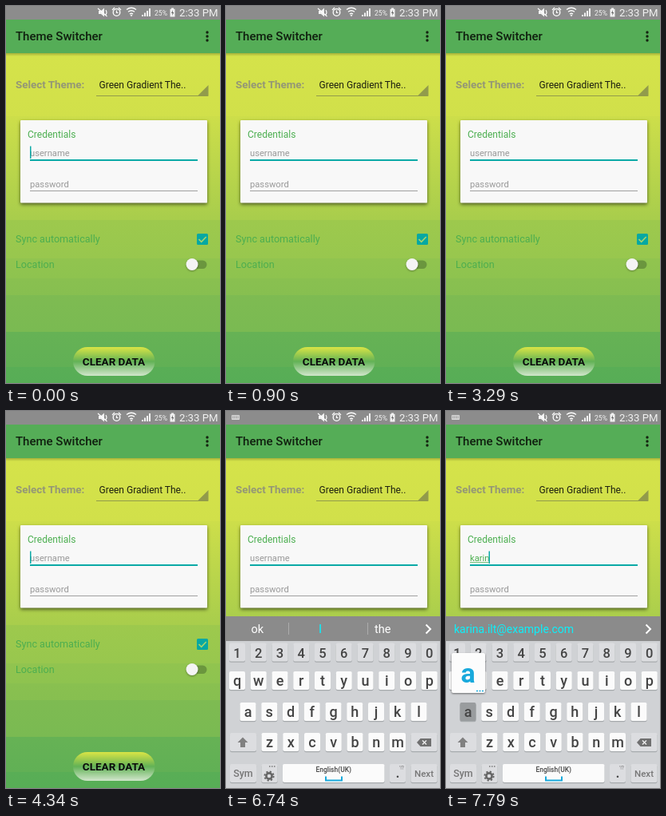
An HTML page that plays this animation: 268 by 472 pixels, repeating every 8000 ms.

```html
<!DOCTYPE html>
<html lang="en">
<head>
<meta charset="utf-8">
<title>Theme Switcher</title>
<style>
html, body { margin: 0; width: 100%; height: 100%; overflow: hidden; }
svg { display: block; width: 100vw; height: 100vh; font-family: Roboto, sans-serif; }
text { white-space: pre; }
.mid { text-anchor: middle; }
.card { fill: #f8f8f8; filter: drop-shadow(0 2px 2px rgba(0,0,0,.55)); }
.menu { fill: #f6f6f6; filter: drop-shadow(0 4px 5px rgba(0,0,0,.32)); }
.pop { fill: #fcfcfc; filter: drop-shadow(0 1px 1px rgba(0,0,0,.5)); }
.line { fill: none; stroke: #fff; }
</style>
</head>
<body>
<svg viewBox="0 0 268 472">
  <defs>
    <linearGradient id="bg" x1="0" y1="0" x2="0" y2="472" gradientUnits="userSpaceOnUse"></linearGradient>
    <linearGradient id="pill" x1="0" y1="0" x2="0" y2="1">
      <stop offset="0" stop-color="#dbe545"/>
      <stop offset=".5" stop-color="#62b256"/>
      <stop offset="1" stop-color="#d2e6cc"/>
    </linearGradient>
    <linearGradient id="edge" x1="0" y1="0" x2="0" y2="1">
      <stop offset="0" stop-opacity=".22"/>
      <stop offset="1" stop-opacity="0"/>
    </linearGradient>
  </defs>

  <rect width="268" height="472" fill="url(#bg)"/>
  <rect y="59" width="268" height="4" fill="url(#edge)"/>
  <rect y="17" width="268" height="42" fill="#55ad57"/>
  <rect width="268" height="17" fill="#8c8c8c"/>

  <!-- status bar -->
  <g fill="#f2f2f2">
    <path d="M116 6h3l4-3.500v11l-4-3.500h-3z"/>
    <path class="line" d="M115 3l11.500 10M125 5q2 3 0 6" stroke-width="1.100"/>
    <circle class="line" cx="138.500" cy="8" r="4.300" stroke-width="1.300"/>
    <path class="line" d="M138.500 5.500v3h2M133 5l3-3M144 5l-3-3" stroke-width="1.200"/>
    <path class="line" d="M151 4.500q6-4.500 12 0M153 7.300q4-3 8 0M155 10q2-1.500 4 0" stroke-width="1.400"/>
    <path d="M155.500 11h3l-1.500 2.500z"/>
    <path d="M170 11h2v2h-2zM173 8.500h2V13h-2zM176 6h2v7h-2zM179 3h2v10h-2z"/>
    <text x="186" y="12" font-size="8.600">25%</text>
    <path d="M207 2.500h3v1.200h1.500V13.500h-6V3.700h1.500z"/>
    <path d="M209 5l-2 4h1.500l-.5 3 2.300-4h-1.500z" fill="#666"/>
    <text x="217" y="13" font-size="13.200">2:33 PM</text>
    <g class="keys" opacity=".75"><rect x="7" y="5" width="10" height="6" rx=".8"/>
      <path d="M8 6.800h8M8 8.600h8" stroke="#777" stroke-width=".9" stroke-dasharray="1 .7"/></g>
  </g>

  <text x="12" y="43" font-size="15" font-weight="500" fill="#10200f">Theme Switcher</text>
  <g fill="#14220f"><circle cx="252" cy="33" r="1.700"/><circle cx="252" cy="38" r="1.700"/><circle cx="252" cy="43" r="1.700"/></g>

  <!-- theme spinner -->
  <text x="12" y="103" font-size="13.400" font-weight="700" fill="#949776">Select Theme:</text>
  <text x="116.500" y="103" font-size="12" fill="#1d2010">Green Gradient The..</text>
  <path d="M113 112h140v.9H113zM253.500 99v13.800h-13.800z" fill="#929b4b"/>

  <!-- credentials -->
  <rect class="card" x="18" y="143" width="234" height="103.500" rx="1"/>
  <text x="27" y="165" font-size="12" fill="#4caf50">Credentials</text>
  <text id="user" x="30" y="188" font-size="11.200"></text>
  <rect id="under" x="30" y="189.300" width="23.500" height=".8" fill="#4caf50"/>
  <text x="30" y="227" font-size="11.200" fill="#999">password</text>
  <rect x="30" y="192" width="210" height="2" fill="#0aa9a6"/>
  <rect x="30" y="231" width="210" height="1" fill="#a0a0a0"/>
  <rect id="caret" y="175.500" width="1.500" height="15.500" fill="#0aa9a6"/>

  <!-- options -->
  <g font-size="12.600" fill="#4cae50">
    <text x="12" y="296">Sync automatically</text>
    <text x="12" y="328">Location</text>
  </g>
  <rect x="239" y="285" width="14" height="14" rx="1.500" fill="#06a8a2"/>
  <path d="M241.500 292l3.200 3.300 6-6.300" fill="none" stroke="#a9d56a" stroke-width="1.600"/>
  <rect x="231" y="318.500" width="20.500" height="10.500" rx="5.200" fill="#6b963e"/>
  <circle cx="233" cy="323.500" r="7.500" fill="#f4f4f4" style="filter:drop-shadow(0 1px 1px rgba(0,0,0,.35))"/>
  <rect x="84" y="427" width="102.500" height="36" rx="18" fill="url(#pill)"/>
  <text class="mid" x="135" y="450" font-size="13.500" font-weight="700" fill="#0b0b0b">CLEAR DATA</text>

  <g id="menu" font-size="12" fill="#161616">
    <rect class="menu" x="111" y="82" width="131" height="72" rx="1"/>
    <text x="116.500" y="104">Material-Light</text>
    <text x="116.500" y="140">Green Gradient Theme</text>
  </g>

  <!-- keyboard -->
  <g class="keys">
    <rect y="257" width="268" height="31" fill="#8b8b8b"/>
    <g id="words" font-size="14.500" fill="#fff">
      <path d="M78.500 265v15M177.500 265v15" stroke="#acacac"/>
      <text x="31.500" y="277.500">ok</text>
      <text class="mid" x="118" y="277.500" font-weight="500" fill="#1ce2ec">I</text>
      <text x="186" y="277.500">the</text>
    </g>
    <text id="mail" x="10" y="278" font-size="14" fill="#0cf0fa">karina.ilt@example.com</text>
    <path class="line" d="M250.500 267.500l5.500 5.500-5.500 5.500" stroke-width="2"/>
    <rect y="288" width="268" height="184" fill="#d0d2d5"/>
    <g id="board"></g>
    <path d="M21 408.500l6.500 6.500h-3.500v6h-6v-6h-3.500z" fill="#808080"/>
    <path d="M239 415l4.500-5H257v10h-13.500z" fill="#707070"/>
    <path d="M246 412.500l5 5m0-5l-5 5" stroke="#eee" stroke-width="1.400"/>
    <circle cx="54" cy="457" r="3.600" fill="none" stroke="#666" stroke-width="2.600"/>
    <circle cx="54" cy="457" r="5.600" fill="none" stroke="#666" stroke-width="2" stroke-dasharray="2.200 2.200"/>
    <path d="M54 445h1.500m1.500 0h1.500m1.500 0h1.500" stroke="#777" stroke-width="1.300"/>
    <text x="217" y="449" font-size="6.500" fill="#777">'!?</text>
    <path id="space" d="M125 457.500v5h20v-5" fill="none" stroke-width="2"/>
  </g>
  <g id="pop">
    <rect class="pop" x="7" y="303" width="42" height="50" rx="2"/>
    <text class="mid" x="27.500" y="340" font-size="34" font-weight="700" fill="#18a9dc">a</text>
    <path d="M38 350.500h2m1.500 0h2m1.500 0h2" stroke="#18a9dc" stroke-width="1.700"/>
  </g>
</svg>
<script>
const $ = id => document.getElementById(id);
const show = (el, on) => { el.style.display = on ? '' : 'none'; };
const WHITE = '#fbfbfb', GREY = '#dcdde0', DARK = '#444', SOFT = '#777';

// Each band: top, bottom, first and last colour
const bands = [
  [59, 138, '#d5e34a', '#d1e04a'],
  [138, 268, '#cdde4a', '#a8cd4c'],
  [268, 316, '#9dc94d', '#98c74e'],
  [316, 341, '#91c44f', '#8ec34f'],
  [341, 362, '#89c050', '#87bf50'],
  [362, 408, '#7ebb52', '#7aba52'],
  [408, 452, '#66b255', '#61b055'],
  [452, 472, '#59ae56', '#57ad56'],
];
$('bg').innerHTML = bands.map(([top, bottom, from, to]) =>
  `<stop offset="${top / 472}" stop-color="${from}"/><stop offset="${bottom / 472}" stop-color="${to}"/>`).join('');

let board = '';
function key(x, y, w, label, size = 18, fill = WHITE, base = 18, ink = DARK) {
  const id = label === 'a' ? 'id="keyA"' : '';
  board += `<rect x="${x}" y="${y + 1.3}" width="${w}" height="23" rx="2" fill="#a6aaad"/>
    <rect ${id} x="${x}" y="${y}" width="${w}" height="23" rx="2" fill="${fill}"/>
    <text class="mid" x="${x + w / 2}" y="${y + base}" font-size="${size}" font-weight="500" fill="${ink}">${label}</text>`;
}
function row(chars, x, y, size, fill) {
  [...chars].forEach((c, i) => key(x + i * 26.75, y, 20, c, size, fill));
}
row('1234567890', 4, 290.5, 16.5, GREY);
row('qwertyuiop', 4, 326);
row('asdfghjkl', 17.5, 365);
key(5, 403, 33, '', 12, GREY);
row('zxcvbnm', 44.5, 403);
key(231.5, 403, 33, '', 12, GREY);
key(5, 442, 33, 'Sym', 12.5, GREY, 16, SOFT);
key(44.5, 442, 20, '', 12, GREY);
key(71, 442, 127.5, 'English(UK)', 8.5, WHITE, 10);
key(205, 442, 20, '.', 18, GREY, 17);
key(231.5, 442, 33, 'Next', 11.5, GREY, 16, SOFT);
$('board').innerHTML = board;

const keyboardParts = document.querySelectorAll('.keys');
const within = (t, a, b) => t >= a && t < b;

function draw(now) {
  const t = now % 8000;
  const typed = t >= 7790;
  const caretOff = within(t, 900, 2090) || within(t, 3290, 4340) || within(t, 6740, 7790);

  show($('menu'), within(t, 2090, 3290));
  keyboardParts.forEach(el => show(el, t >= 5540));
  $('space').setAttribute('stroke', t >= 6740 ? '#18a9dc' : '#555');

  $('user').textContent = typed ? 'karin' : 'username';
  $('user').setAttribute('fill', typed ? '#4caf50' : '#999');
  show($('under'), typed);
  show($('caret'), !caretOff);
  $('caret').setAttribute('x', typed ? 53.5 : 30);

  show($('words'), !typed);
  show($('mail'), typed);
  show($('pop'), typed);
  $('keyA').setAttribute('fill', typed ? '#999c9e' : WHITE);
}

const start = performance.now();
function tick() {
  draw(performance.now() - start);
  requestAnimationFrame(tick);
}
tick();
</script>
</body>
</html>
```
